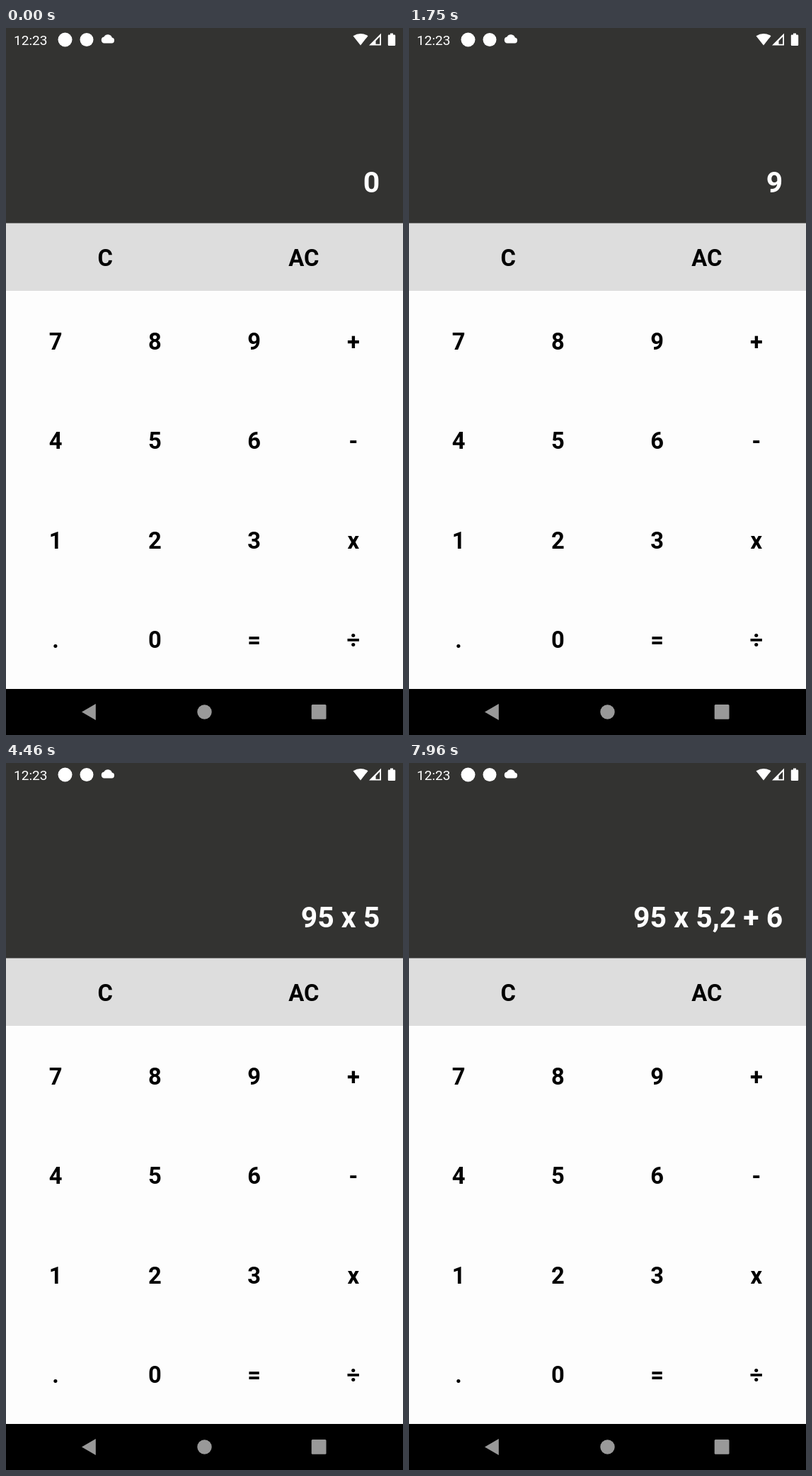
Animation, 561 px wide and 998 px high, one loop 8000 ms. Source, as an HTML page:

```html
<!DOCTYPE html>
<html lang="en">
<head>
<meta charset="utf-8">
<title>Calculator</title>
<style>
  html, body { margin: 0; width: 100%; height: 100%; overflow: hidden; background: #000; }
  svg { display: block; width: 100%; height: 100%; }
  text { font-family: Roboto, sans-serif; }
  .key { font-size: 32.7px; font-weight: 700; text-anchor: middle; }
  #display { font-size: 40.9px; font-weight: 700; text-anchor: end; fill: #fff; }
</style>
</head>
<body>
<svg viewBox="0 0 561 998">
  <rect width="561" height="276" fill="#333331"/>
  <rect y="275.5" width="561" height="96" fill="#ddd"/>
  <rect y="371" width="561" height="562" fill="#fdfdfd"/>
  <rect y="933" width="561" height="65"/>

  <g fill="#fff">
    <text x="11" y="24" font-size="19.1">12:23</text>
    <circle cx="83.5" cy="16.5" r="10"/>
    <circle cx="114" cy="16.5" r="9.5"/>
    <path d="M139 21.5a4.6 4.6 0 0 1-.5-9.1a6.2 6.2 0 0 1 11.3 1.2a4 4 0 0 1-.3 7.9z"/>
    <path d="M490.5 11.2Q501 4.6 511.5 11.2L501 24.5z"/>
    <path d="M513 24.5L530 7.5V24.5zM522.5 18.2V22.7H528.2V12.2z" fill-rule="evenodd"/>
    <path d="M543 7.5h4v2h2q1.200 0 1.200 1.200v13q0 1.300-1.200 1.300h-8q-1.200 0-1.200-1.300v-13q0-1.200 1.200-1.200h2z"/>
  </g>

  <text id="display" x="528.3" y="231.6">0</text>
  <circle id="press" r="52" fill="#ddd" visibility="hidden"/>
  <g id="keys"></g>

  <g fill="#999">
    <path d="M107 965.500L126.800 954V977z"/>
    <circle cx="280.500" cy="965.500" r="10.200"/>
    <rect x="431.700" y="955" width="20.800" height="20.800" rx="1.500"/>
  </g>
</svg>
<script>
const LOOP = 8000, HOLD = 80, CELL = 140.25;
const ROWS = ["789+", "456-", "123x", ".0=÷"];
const $ = id => document.getElementById(id);
const display = $("display"), press = $("press");

// [key, pressed at, display text, text appears at]
const TAPS = [
  ["9", 920, "9", 1130],
  ["5", 1840, "95", 2050],
  ["x", 2380, "95 x", 2550],
  ["5", 3630, "95 x 5", 3840],
  [".", 4380],
  ["2", 4880, "95 x 5,2", 5050],
  ["+", 6340, "95 x 5,2 +", 6590],
  ["6", 7090, "95 x 5,2 + 6", 7300],
  [".", 7880]
];

function addKey(label, x, y) {
  const el = document.createElementNS("http://www.w3.org/2000/svg", "text");
  el.setAttribute("class", "key");
  el.setAttribute("x", x);
  el.setAttribute("y", y + 12.8);
  el.textContent = label;
  $("keys").append(el);
}

const spots = {};
addKey("C", CELL, 323.3);
addKey("AC", CELL * 3, 323.3);
ROWS.forEach((row, r) => [...row].forEach((label, c) => {
  const spot = spots[label] = [CELL * (c + 0.5), 441.2 + CELL * r];
  addKey(label, ...spot);
}));

function draw(t) {
  let text = "0", down = null;
  for (const [key, at, result, shown] of TAPS) {
    if (t >= at && t < at + HOLD) down = key;
    if (result && t >= shown) text = result;
  }
  if (display.textContent !== text) display.textContent = text;
  press.setAttribute("visibility", down ? "visible" : "hidden");
  if (down) {
    press.setAttribute("cx", spots[down][0]);
    press.setAttribute("cy", spots[down][1]);
  }
}

const start = performance.now();
function tick() {
  draw((performance.now() - start) % LOOP);
  requestAnimationFrame(tick);
}
tick();
</script>
</body>
</html>
```
